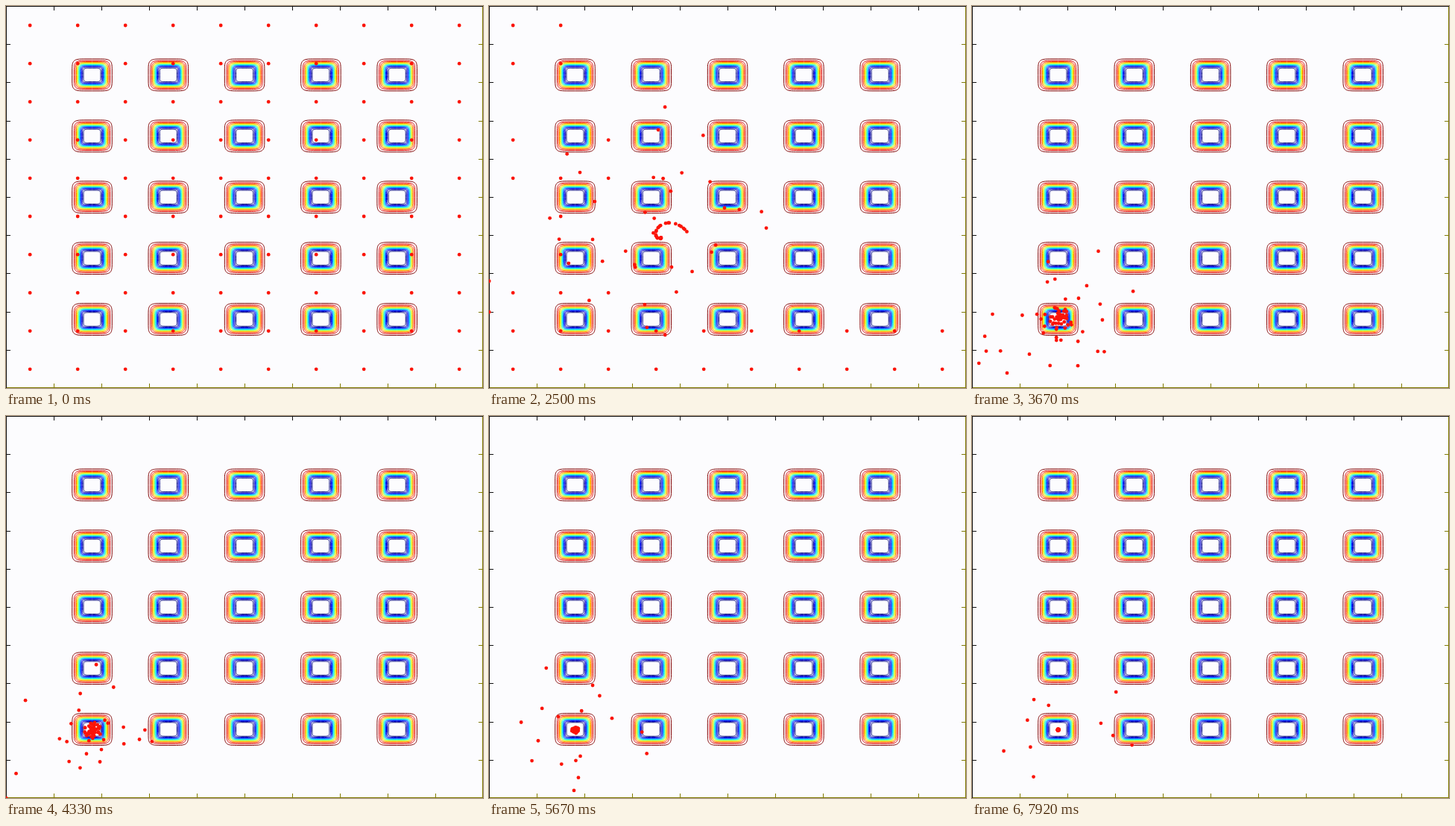
An HTML page with a canvas for the animation above (8000 ms loop, 640 px wide and 512 px high).

```html
<!DOCTYPE html>
<html lang="en">
<head>
<meta charset="utf-8">
<title>Swarm search on a foxhole landscape</title>
<style>
  html, body { margin: 0; width: 100%; height: 100%; overflow: hidden; background: #fcfcfe; }
  canvas { display: block; }
</style>
</head>
<body>
<canvas id="view" width="640" height="512"></canvas>
<script>
const W = 640, H = 512, LOOP = 8000, COUNT = 100, LEVELS = 14;
const HOLD = 24; // generations before the search begins
const BEST = { x: 115.5, y: 420.5 };
const ctx = document.getElementById('view').getContext('2d');

const clamp = (v, max) => Math.min(max, Math.max(0, v));
const rnd = (a, b) => {
  const v = Math.sin(a * 127.1 + b * 311.7) * 43758.5453;
  return v - Math.floor(v);
};
const bell = (a, b) =>
  Math.sqrt(-2 * Math.log(1 - rnd(a, b))) * Math.cos(2 * Math.PI * rnd(a + 0.5, b));

// Ten generations a second, sampled twelve times a second.
function generation(t) {
  const slot = Math.floor(t * 0.012 + 0.05);
  return 5 * Math.floor(slot / 6) + [0, 1, 2, 2, 3, 4][slot % 6];
}

// The lower rows and left columns of the starting grid move last.
function firstMove(i, col, row) {
  const slow = row > 7 || (col < 3 && rnd(i, 3) < 0.7);
  return slow ? 2 + Math.floor(5 * rnd(i, 4)) : 1;
}

// Position of dot i after n generations of searching.
function dotAt(i, n) {
  const col = i % 10, row = Math.floor(i / 10);
  if (n < firstMove(i, col, row)) return [32 + 64 * col, 25.8 + 51.2 * row];

  const drift = Math.exp((1 - n) / 3);
  const cx = BEST.x + 115 * drift, cy = BEST.y - 110 * drift;
  const stragglers = 5 + 50 * Math.exp(-n / 22);
  if (i * 37 % COUNT < stragglers) {
    const spread = 50 + 50 * Math.exp((1 - n) / 5);
    return [
      clamp(cx + spread * bell(i, n), W),
      clamp(cy + 0.8 * spread * bell(i + COUNT, n), H)
    ];
  }
  const r = 18 * Math.exp((13 - n) / 15) * rnd(i, 1) ** 3;
  const a = 2 * Math.PI * rnd(i, n);
  return [cx + r * Math.cos(a), cy + r * Math.sin(a)];
}

function jet(v) {
  const band = c => Math.round(255 * clamp(1.5 - Math.abs(4 * v - c), 1));
  return `rgb(${band(3)},${band(2)},${band(1)})`;
}

// Level set of a sixth-power well.
function ring(g, cx, cy, level) {
  const r = 18.03 * (level / (1 - level)) ** (1 / 6);
  const bend = v => Math.sign(v) * Math.abs(v) ** (1 / 3);
  g.beginPath();
  for (let i = 0; i < 96; i++) {
    const a = i * Math.PI / 48;
    g.lineTo(cx + r * bend(Math.cos(a)), cy + 0.8 * r * bend(Math.sin(a)));
  }
  g.closePath();
  g.stroke();
}

function landscape() {
  const layer = document.createElement('canvas');
  layer.width = W;
  layer.height = H;
  const g = layer.getContext('2d');
  const box = (color, ...rect) => { g.fillStyle = color; g.fillRect(...rect); };
  box('#fcfcfe', 0, 0, W, H);

  for (let k = 1; k <= LEVELS; k++) {
    g.strokeStyle = jet(((k - 1) / (LEVELS - 1)) ** 1.2);
    for (let i = 0; i < 25; i++) {
      ring(g, 115.5 + 102.3 * (i % 5), 92.4 + 81.9 * Math.floor(i / 5), 0.915 * k / LEVELS);
    }
  }

  const dark = '#101010', olive = '#807a00';
  box(olive, 0, H - 1, W, 1);
  box(olive, W - 1, 0, 1, H);
  box(dark, 0, 0, W, 1);
  box(dark, 0, 0, 1, H);
  for (let i = 1; i < 10; i++) {
    const x = 64 * i, y = Math.round(51.2 * i);
    box(dark, x, 0, 1, 6);
    box(olive, x, H - 6, 1, 6);
    box(dark, 0, y, 6, 1);
    box(olive, W - 6, y, 6, 1);
  }
  return layer;
}

const backdrop = landscape();

function draw() {
  const n = generation(performance.now() % LOOP) - HOLD;
  ctx.drawImage(backdrop, 0, 0);
  ctx.fillStyle = '#fb1408';
  for (let i = 0; i < COUNT; i++) {
    const [x, y] = dotAt(i, n);
    ctx.beginPath();
    ctx.arc(x + 0.2, y + 0.2, 2.4, 0, 2 * Math.PI);
    ctx.fill();
  }
  requestAnimationFrame(draw);
}
draw();
</script>
</body>
</html>
```
